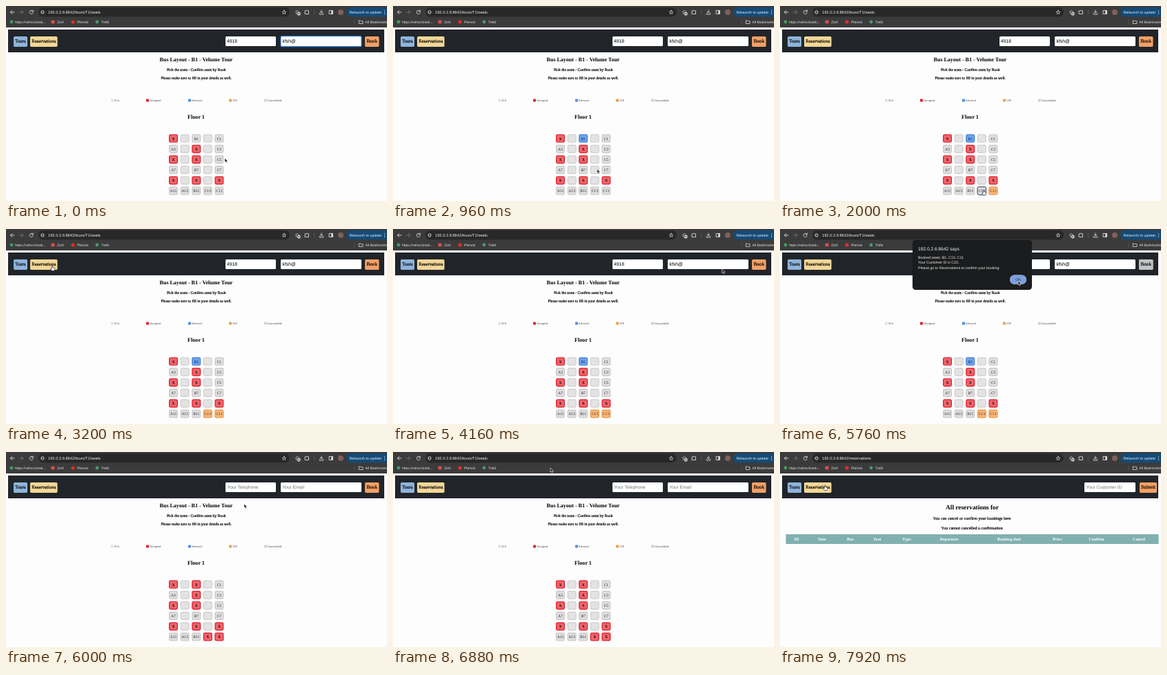
These frames come from a looping animation (552 px wide and 282 px high, 8000 ms). An HTML page:

```html
<!DOCTYPE html>
<html lang="en">
<head>
<meta charset="utf-8">
<title>Seat booking</title>
<style>
  html, body { margin: 0; width: 100%; height: 100%; overflow: hidden; background: #fdfdfd; }
  svg { display: block; width: 552px; height: 282px; }
  text { font-family: "Liberation Serif", serif; text-rendering: geometricPrecision; white-space: pre; }
  .sans { font-family: "Liberation Sans", sans-serif; }
  .bold { font-weight: 700; }
  .mid { text-anchor: middle; }
  .ink { stroke: #000; stroke-width: .2px; }

  /* One percent of the loop is 80 ms. */
  .step { animation: 8s step-end infinite; }
  .focus { animation-name: focus; }
  .pickB1 { animation-name: pickB1; }
  .pickC11 { animation-name: pickC11; }
  .pressC13 { animation-name: pressC13; }
  .pickC13 { animation-name: pickC13; }
  .bookHover { animation-name: bookHover; }
  .okHover { animation-name: okHover; }
  .filled { animation-name: filled; }
  .booked { animation-name: booked; }
  .tourPage { animation-name: tourPage; }
  .listPage { animation-name: listPage; }
  .hand { animation-name: hand; }
  .arrow { animation-name: arrow; }
  .dialog { animation: dialog 8s linear infinite; }
  .cursor { animation: cursor 8s ease-in-out infinite; }

  @keyframes focus { 0% { opacity: 1 } 4%, 100% { opacity: 0 } }
  @keyframes pickB1 { 0% { opacity: 0 } 4% { opacity: 1 } 75%, 100% { opacity: 0 } }
  @keyframes pickC11 { 0% { opacity: 0 } 17% { opacity: 1 } 75%, 100% { opacity: 0 } }
  @keyframes pressC13 { 0% { opacity: 0 } 24% { opacity: 1 } 26%, 100% { opacity: 0 } }
  @keyframes pickC13 { 0% { opacity: 0 } 26% { opacity: 1 } 75%, 100% { opacity: 0 } }
  @keyframes bookHover { 0% { opacity: 0 } 55% { opacity: 1 } 75%, 100% { opacity: 0 } }
  @keyframes okHover { 0% { opacity: 0 } 67% { opacity: 1 } 75%, 100% { opacity: 0 } }
  @keyframes filled { 0% { opacity: 1 } 75%, 100% { opacity: 0 } }
  @keyframes booked { 0% { opacity: 0 } 75%, 100% { opacity: 1 } }
  @keyframes tourPage { 0% { opacity: 1 } 97%, 100% { opacity: 0 } }
  @keyframes listPage { 0% { opacity: 0 } 97%, 100% { opacity: 1 } }
  @keyframes hand {
    0% { opacity: 0 } 3% { opacity: 1 } 8% { opacity: 0 } 15% { opacity: 1 } 31% { opacity: 0 }
    38% { opacity: 1 } 42% { opacity: 0 } 54% { opacity: 1 } 60% { opacity: 0 } 95%, 100% { opacity: 1 }
  }
  @keyframes arrow {
    0% { opacity: 1 } 3% { opacity: 0 } 8% { opacity: 1 } 15% { opacity: 0 } 31% { opacity: 1 }
    38% { opacity: 0 } 42% { opacity: 1 } 54% { opacity: 0 } 60% { opacity: 1 } 95%, 100% { opacity: 0 }
  }
  @keyframes dialog {
    0%, 57% { opacity: 0; transform: translateY(-2px) }
    58% { opacity: .5; transform: translateY(-2px) }
    59% { opacity: .9; transform: translateY(-1px) }
    60%, 74% { opacity: 1; transform: none }
    75%, 100% { opacity: 0; transform: none }
  }
  @keyframes cursor {
    0%, 1% { transform: translate(317px, 220px) }
    4%, 7% { transform: translate(276px, 191px) }
    16%, 19% { transform: translate(309px, 266px) }
    24%, 29% { transform: translate(295px, 266px) }
    39%, 41% { transform: translate(67px, 53px) }
    48%, 51% { transform: translate(472px, 58px) }
    56%, 60% { transform: translate(528px, 55px) }
    68%, 75% { transform: translate(345px, 75px) }
    86%, 91% { transform: translate(228px, 23px) }
    96%, 100% { transform: translate(65px, 48px) }
  }
</style>
</head>
<body>
<svg id="stage" viewBox="0 0 552 282"></svg>
<script>
const rect = (x, y, w, h, fill, r = 0, more = '') =>
  `<rect x="${x}" y="${y}" width="${w}" height="${h}" rx="${r}" fill="${fill}" ${more}/>`;
const dot = (x, y, r, fill) => `<circle cx="${x}" cy="${y}" r="${r}" fill="${fill}"/>`;
const line = (d, color, width = .9) =>
  `<path d="${d}" fill="none" stroke="${color}" stroke-width="${width}" stroke-linecap="round" stroke-linejoin="round"/>`;
const text = (x, y, str, size, cls = '', fill = '#000') =>
  `<text x="${x}" y="${y}" font-size="${size}" class="${cls}" fill="${fill}">${str}</text>`;
const group = (cls, ...parts) => `<g class="${cls}">${parts.join('')}</g>`;

const host = '192.0.2.6:8642';
const light = '#dcdcdc';

function browserBar() {
  const label = (x, str) => text(x, 25, str, 5, 'sans', '#e6e6e6');
  return [
    rect(0, 0, 552, 31, '#3b3b3c'),
    rect(47, 2, 364, 13.5, '#282829', 6.7),
    line('M12 9H6.5M9 6.5L6.5 9L9 11.5', light),
    line('M19.5 9H25M22.5 6.5L25 9L22.5 11.5', '#777'),
    line('M39 7.6A2.6 2.6 0 1 0 39.3 9.8M39.3 6V8H37.3', light),
    dot(53, 9, 3.6, '#3b3b3c'),
    line('M51 9a2 2 0 1 0 4 0a2 2 0 1 0 -4 0', light, .8),
    line('M403 6.2L403.8 8.2L405.8 8.3L404.3 9.6L404.8 11.6L403 10.5L401.2 11.6L401.7 9.6L400.2 8.3L402.2 8.2Z', light, .7),
    line('M419.5 8.5L422 6.5L424.5 8.5V10M420.5 9V11.5', '#bbb'),
    rect(422, 9, 4.5, 4.5, '#ddd', 1), line('M423.2 10.2l2 2m0-2l-2 2', '#333', .7),
    line('M433.5 7H435.2A.8 .8 0 0 1 436.8 7H438.5V11.5H433.5Z', light),
    line('M446.5 6V12', '#666', .6),
    line('M457 6V9.8M455.3 8.2L457 9.9L458.7 8.2M454.3 10.5V12H459.7V10.5', light),
    line('M468.5 6.5H473.5V11.5H468.5Z', light), rect(471.2, 6.5, 2.3, 5, light),
    dot(485, 9, 4, '#80605a'),
    rect(493, 2, 64, 13.5, '#164a75', 6.7),
    text(497.5, 10.8, 'Relaunch to update', 5.35, 'sans', '#e4f2ff'),
    dot(548.5, 6.8, .6, '#e4f2ff'), dot(548.5, 9, .6, '#e4f2ff'), dot(548.5, 11.2, .6, '#e4f2ff'),
    dot(8, 23, 2.4, '#3f9f62'), label(13, 'https://velno.brask...'),
    rect(65.5, 20.7, 5, 4.6, '#d9514a'), label(74, 'Zorli'),
    dot(97, 23, 2.6, '#e52d27'), label(103, 'Plenvio'),
    dot(132, 23, 2.4, '#4a9a68'), label(138, 'Trelb'),
    line('M505 20V26', '#666', .6),
    line('M511.7 21H513.5L514.2 21.8H517V25.5H511.7Z', light, .8),
    label(520.5, 'All Bookmarks'),
  ].join('');
}

const url = path => text(61, 11, host + path, 5.72, 'sans', '#f0f0f0');
const field = (x, w) => rect(x, 44, w, 14, '#fff', 1.5);
const hint = (x, str) => text(x, 53.3, str, 6.55, 'sans', '#707070');
const typed = (x, str) => text(x, 53.3, str, 6.8, 'sans');
const button = (x, w, fill, str, size) =>
  rect(x, 44, w, 15, fill, 1.7) + text(x + w / 2, 53.4, str, size, 'mid ink');

const navbar = () => rect(0, 31, 552, 251, '#fdfdfd') + rect(3, 34, 545, 33, '#212529') +
  button(11, 20, '#8eb4dc', 'Tours', 6.8) + button(35, 39.5, '#f3d797', 'Reservations', 6.8);

// Seats: fill, rim and label colours per state.
const styles = {
  free: ['#dedede', '#c8c8c8', '#222'],
  aisle: ['#e3e3e3', '#cfcfcf', '#222'],
  taken: ['#f0646c', '#e01c2a', '#000'],
  chosen: ['#6ba2ee', '#4a86dc', '#123'],
  vip: ['#f9b676', '#f09a4c', '#421'],
};
const seatX = col => 242.5 + col * 16.6;
const seatY = row => 191.6 + row * 15.15;

function seat(col, row, label, state) {
  const [fill, rim, ink] = styles[state];
  const x = seatX(col), y = seatY(row);
  return rect(x - 5.9, y - 5.4, 11.8, 10.8, fill, 1.8, `stroke="${rim}" stroke-width="1.2"`) +
    text(x, y + 2, label, 5.6, 'mid' + (state === 'taken' ? ' bold' : ''), ink);
}
const taken = (col, row) => seat(col, row, 'X', 'taken');

const plan = ['X,,B1,,C1', 'A3,,X,,C3', 'X,,X,,C5', 'A7,,B7,,C7', 'X,,X,,X', 'A11,A13,B11,C13,C11'];
const seats = () => plan.map((cells, row) => cells.split(',').map((label, col) =>
  seat(col, row, label, label === 'X' ? 'taken' : label ? 'free' : 'aisle')).join('')).join('');

function legend() {
  const items = [[152, '#e2e2e2', 'N/A'], [203, '#dc2632', 'Occupied'], [264, '#4f8fe0', 'Selected'],
    [323, '#f0a04c', 'VIP'], [374, '#d2d2d2', 'Unavailable']];
  return items.map(([x, fill, str]) =>
    rect(x, 134.4, 4, 4, fill, .6) + text(x + 5, 138, str, 4.3, '', '#444')).join('');
}

function tourPage() {
  return group('step tourPage',
    navbar(), url('/tours/T1/seats'),
    field(318, 73), field(398, 117), button(520, 20.5, '#f2a066', 'Book', 7.1),
    group('step bookHover', button(520, 20.5, '#c4c4c4', 'Book', 7.1)),
    group('step filled', typed(320, '4918'), typed(400.5, 'kfsh@')),
    group('step booked', hint(320.5, 'Your Telephone'), hint(400.5, 'Your Email')),
    group('step focus', rect(398, 43.6, 117, 15, 'none', 1.7, 'stroke="#2f7fe0" stroke-width="1.2"')),
    text(275.5, 80.4, 'Bus Layout - B1 - Velume Tour', 8, 'mid bold'),
    text(275.7, 94.4, 'Pick the seats - Confirm seats by Book', 5.5, 'mid ink'),
    text(275.7, 105.8, 'Please make sure to fill in your details as well.', 5.5, 'mid ink'),
    legend(),
    text(275.5, 162.6, 'Floor 1', 8.1, 'mid bold'),
    seats(),
    group('step pickB1', seat(2, 0, 'B1', 'chosen')),
    group('step pickC11', seat(4, 5, 'C11', 'vip')),
    group('step pressC13',
      rect(seatX(3) - 6.3, seatY(5) - 5.8, 12.6, 11.6, 'none', 2.2, 'stroke="#34466f" stroke-width="1"')),
    group('step pickC13', seat(3, 5, 'C13', 'vip')),
    group('step booked', taken(2, 0), taken(3, 5), taken(4, 5)));
}

function listPage() {
  const columns = [[24, 'ID'], [61, 'Tour'], [102, 'Bus'], [141, 'Seat'], [183.5, 'Type'], [245, 'Departure'],
    [332, 'Booking date'], [402, 'Price'], [458.5, 'Confirm'], [520, 'Cancel']];
  return group('step listPage',
    navbar(), url('/reservations'),
    field(441, 74), hint(443.5, 'Your Customer ID'), button(521, 25, '#f2a066', 'Submit', 7.2),
    text(278.5, 82.5, 'All reservations for', 9.3, 'mid bold'),
    text(278, 98.3, 'You can cancel or confirm your bookings here', 6.1, 'mid ink'),
    text(278, 111.7, 'You cannot cancelled a confirmation', 6.1, 'mid ink'),
    rect(8.5, 119, 540, 14, '#80b0af'),
    ...columns.map(([x, str]) => text(x, 128.2, str, 6.1, 'mid bold', '#fff')));
}

function dialog() {
  const row = (y, str) => text(200, y, str, 5.25, 'sans', '#f0f0f0');
  const ok = fill => rect(333, 66.5, 24, 13.5, fill, 6.75) + text(345, 75.2, 'OK', 5.2, 'sans mid', '#14264a');
  return group('dialog',
    rect(192, 16, 173, 72, '#1b1c1d', 4.5),
    text(200, 31.4, host + ' says', 6.65, 'sans', '#f6f6f6'),
    row(43, 'Booked seats: B1, C13, C11'),
    row(50.4, 'Your Customer ID is C10.'),
    row(58, 'Please go to Reservations to confirm your booking.'),
    ok('#a9bff2'), group('step okHover', ok('#7f9fdb')));
}

function cursor() {
  const shape = (d, fill, edge) =>
    `<path d="${d}" fill="${fill}" stroke="${edge}" stroke-width=".6" stroke-linejoin="round"/>`;
  return group('cursor',
    group('step arrow', shape('M0 0V6L1.4 4.8L2.3 6.9L3.5 6.4L2.6 4.4H4.4Z', '#111', '#fff')),
    group('step hand', shape('M-.7 .4Q0 -.5 .7 .4V2.6L3.6 3.3V5.4L2.7 7.5H-.7L-2.5 4.7L-1.8 4L-.7 4.7Z', '#fff', '#111')));
}

document.getElementById('stage').innerHTML =
  browserBar() + tourPage() + listPage() + dialog() + cursor();
</script>
</body>
</html>
```
